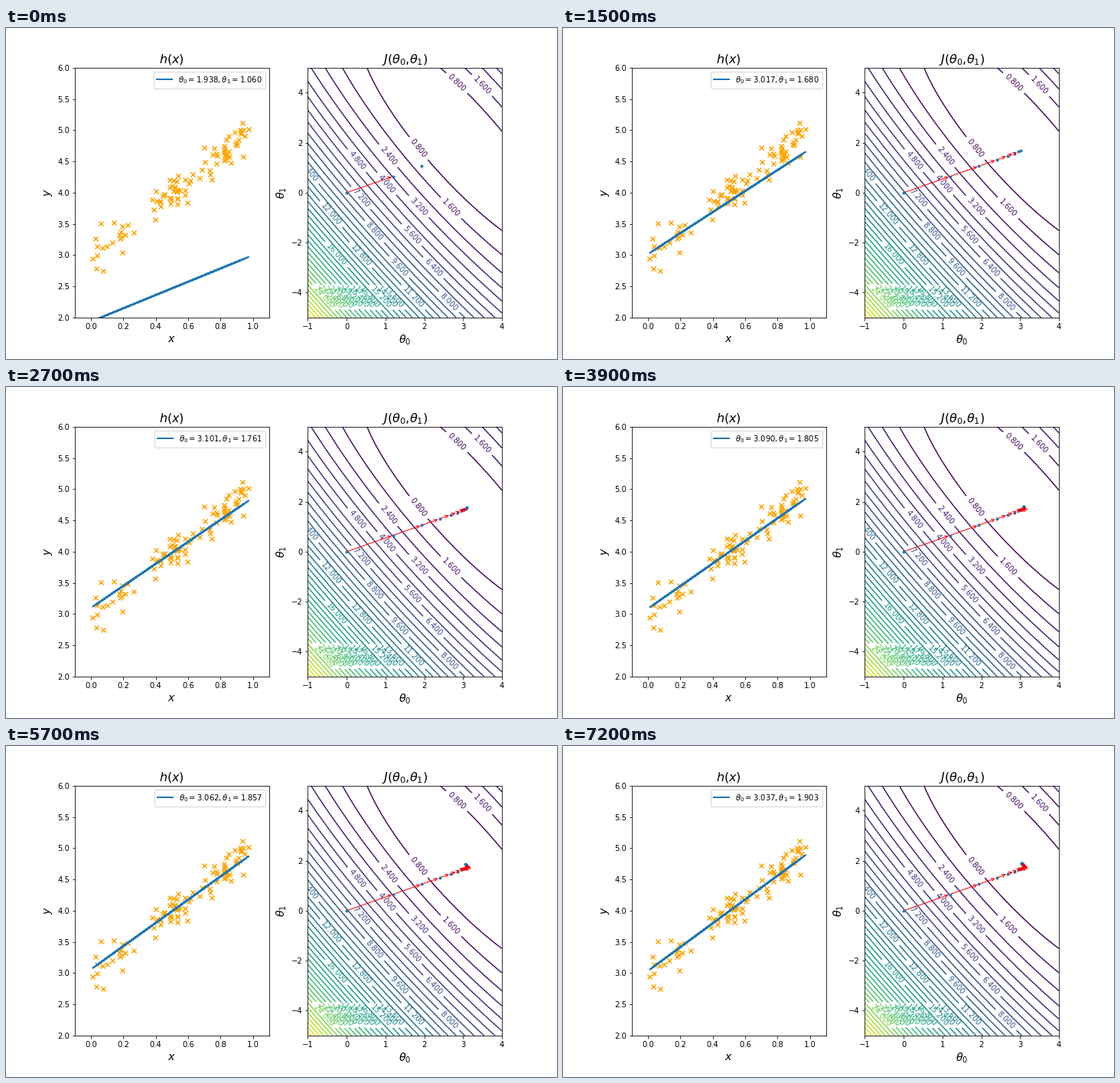
These frames come from a looping animation (720x432 px, 7.5 s). A matplotlib script:

```python
import numpy as np
import matplotlib.pyplot as plt
from matplotlib.animation import FuncAnimation

plt.rcParams.update({"font.family": "DejaVu Sans", "font.size": 10})

RATE = 0.3
P = 0.5385                            # slope of the fast descent direction
GOAL = np.array([4.062, 0.4525])      # optimum along the fast and slow directions
DECAY = np.array([0.61836, 0.9815])   # error left after one step
CURVE = (1 - DECAY) / RATE


def theta(n):
    w, s = GOAL * (1 - DECAY ** n)
    return np.array([w - P * s, s + P * w]) / (1 + P * P)


def cost(t0, t1):
    w = t0 + P * t1 - GOAL[0]
    s = t1 - P * t0 - GOAL[1]
    return (CURVE[0] * w ** 2 + CURVE[1] * s ** 2) / (2 * (1 + P * P)) + 0.015


def make_data(seed=4):
    """Noisy samples around the best line, denser in two places, plus outliers."""
    rng = np.random.RandomState(seed)
    x = np.concatenate([rng.uniform(0.03, 0.95, 46),
                        rng.normal(0.5, 0.04, 18),
                        rng.normal(0.82, 0.06, 20).clip(0.7, 0.95)])
    a, b = theta(np.inf)
    y = a + b * x + rng.normal(0, 0.12, x.size)
    marked = [(0.011, 2.94), (0.028, 3.26), (0.033, 2.78), (0.061, 3.51),
              (0.075, 2.75), (0.141, 3.52), (0.194, 3.04), (0.487, 4.21),
              (0.596, 3.84), (0.700, 4.72), (0.851, 4.91), (0.865, 4.48),
              (0.941, 4.58), (0.974, 5.02)]
    return rng.permutation(np.vstack([np.column_stack([x, y]), marked])).T


def label_spots(contours, fmt, size):
    """Put each label on the straightest stretch of its curve that is still free."""
    to_px = contours.axes.transData
    taken = []
    for level, curves in zip(contours.levels, contours.allsegs):
        width = 0.6 * size * len(fmt % level)
        for curve in curves:
            if len(curve) < 2:
                continue
            pts = to_px.transform(curve)
            if np.ptp(pts, axis=0).max() <= 1.2 * width:
                continue
            count = int(np.ceil(len(pts) / width))
            block = len(pts) if count == 1 else int(width)
            bx_, by_ = (np.resize(c, (count, block)) for c in pts.T)
            dx, dy = bx_[:, -1:] - bx_[:, :1], by_[:, -1:] - by_[:, :1]
            bend = np.abs((by_[:, :1] - by_) * dx - (bx_[:, :1] - bx_) * dy)
            order = np.argsort((bend / np.hypot(dx, dy)).sum(axis=1))
            mids = np.column_stack([bx_[:, block // 2], by_[:, block // 2]])[order]
            free = [m for m in mids
                    if all(np.hypot(*(m - t)) >= 1.2 * width for t in taken)]
            taken.append(free[0] if free else mids[0])
    return to_px.inverted().transform(taken)


# Steps shown: every one at first, then every second, then every third
steps = [0, 1, *range(2, 10), *range(10, 30, 2), *range(30, 49, 3)]
path = np.array([theta(n) for n in steps])
FRAMES = len(path) - 2
x, y = make_data()

fig, (ax, bx) = plt.subplots(1, 2, figsize=(10, 6), dpi=72)
fig.subplots_adjust(left=0.125, right=0.9, bottom=0.125, top=0.88, wspace=0.2)

ax.scatter(x, y, marker="x", color="orange")
line, = ax.plot(x, x, lw=2, label=r"$\theta_0=0.000,\theta_1=0.000$")
ax.set(xlim=(-0.1, 1.1), ylim=(2, 6))
ax.set_title("$h(x)$", fontsize=16)
ax.set_xlabel("$x$", fontsize=14)
ax.set_ylabel("$y$", fontsize=14)
caption = ax.legend(loc="upper right").get_texts()[0]

t0, t1 = np.meshgrid(np.linspace(-1, 4, 100), np.linspace(-5, 5, 100))
contours = bx.contour(t0, t1, cost(t0, t1), levels=np.arange(39) * 0.8,
                      linewidths=1.5, algorithm="mpl2014")
bx.set(xlim=(-1, 4), ylim=(-5, 5))
bx.set_title(r"$J(\theta_0{,}\theta_1)$", fontsize=16)
bx.set_xlabel(r"$\theta_0$", fontsize=14)
bx.set_ylabel(r"$\theta_1$", fontsize=14)
spots = label_spots(contours, "%1.3f", 10)
contours.clabel(manual=spots.tolist(), fmt="%1.3f", fontsize=10, inline=True)

dots, = bx.plot([], [], "o", color="C0", ms=3)
arrows = [bx.annotate("", xy=b, xytext=a,
                      arrowprops=dict(arrowstyle="->", color="r", lw=1))
          for a, b in zip(path[:FRAMES], path[1:])]


def draw(k):
    a, b = path[k + 2]
    line.set_data(x, a + b * x)
    caption.set_text(rf"$\theta_0={a:.3f}{{}},\theta_1={b:.3f}$")
    dots.set_data(*path[:k + 3].T)
    for j, arrow in enumerate(arrows):
        arrow.set_visible(j <= k)
    return line, caption, dots, *arrows


anim = FuncAnimation(fig, draw, frames=FRAMES, interval=300, repeat=True, repeat_delay=0)
plt.show()
```
